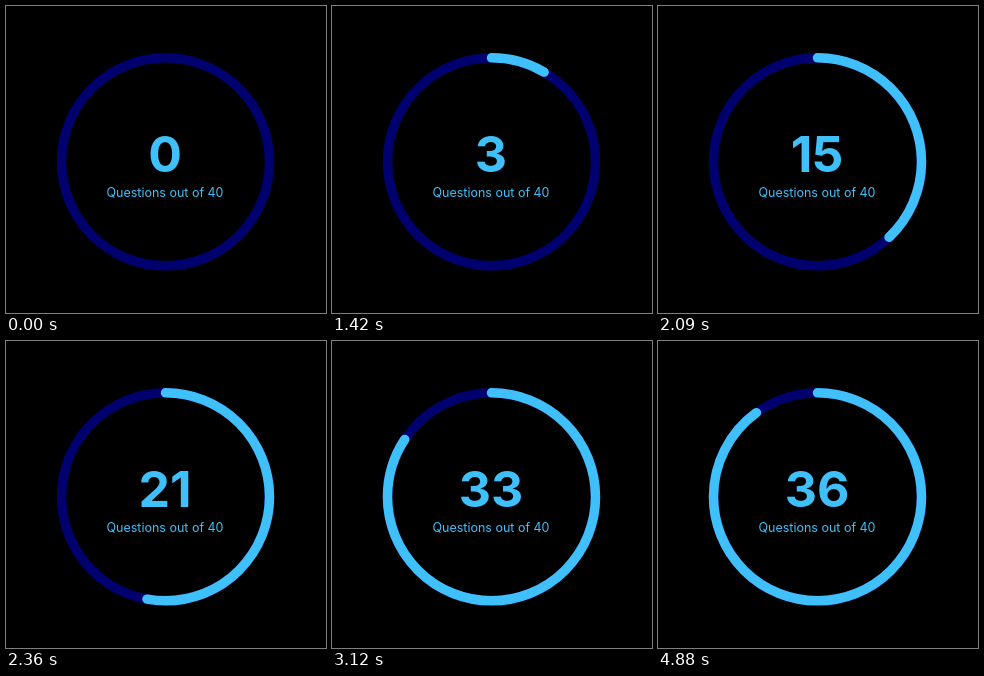
Write an HTML page that moves like this. It is 320 px wide and 307 px high and loops after 4910 ms.

```html
<!DOCTYPE html>
<html lang="en">
<head>
<meta charset="utf-8">
<title>Question progress</title>
<style>
  html, body { margin: 0; width: 100%; height: 100%; overflow: hidden; background: #000; }
  svg { display: block; width: 100%; height: 100%; }
  circle { fill: none; stroke-width: 9.5; }
  text { fill: #40c0fa; text-anchor: middle; font-family: Inter, Roboto, sans-serif; }
</style>
</head>
<body>
<svg viewBox="0 0 320 307">
  <circle cx="159.5" cy="155.8" r="104" stroke="#00006e"/>
  <circle id="arc" cx="159.5" cy="155.8" r="104" stroke="#40c0fa" stroke-linecap="round"
          pathLength="40" transform="rotate(-90 159.5 155.8)"/>
  <text id="count" x="159" y="166" font-size="50" font-weight="700">0</text>
  <text x="159" y="191" font-size="12.5">Questions out of 40</text>
</svg>
<script>
  const LOOP = 4910, START = 824, DURATION = 2790, VISIBLE_FROM = 970, GOAL = 36;
  const arc = document.getElementById('arc');
  const count = document.getElementById('count');

  // cubic-bezier(.42, 0, .58, 1), solved by bisection
  function easeInOut(x) {
    if (x <= 0 || x >= 1) return x <= 0 ? 0 : 1;
    let low = 0, high = 1, s;
    for (let i = 0; i < 24; i++) {
      s = (low + high) / 2;
      const r = 1 - s;
      const bx = 1.26 * s * r * r + 1.74 * s * s * r + s * s * s;
      if (bx < x) low = s; else high = s;
    }
    return s * s * (3 - 2 * s);
  }

  function draw(now) {
    const time = now % LOOP;
    const value = GOAL * easeInOut((time - START) / DURATION);
    arc.style.visibility = time < VISIBLE_FROM ? 'hidden' : 'visible';
    arc.setAttribute('stroke-dasharray', `${value} 80`);
    count.textContent = Math.floor(value + 0.01);
  }

  function tick() {
    draw(performance.now());
    requestAnimationFrame(tick);
  }
  tick();
</script>
</body>
</html>
```
